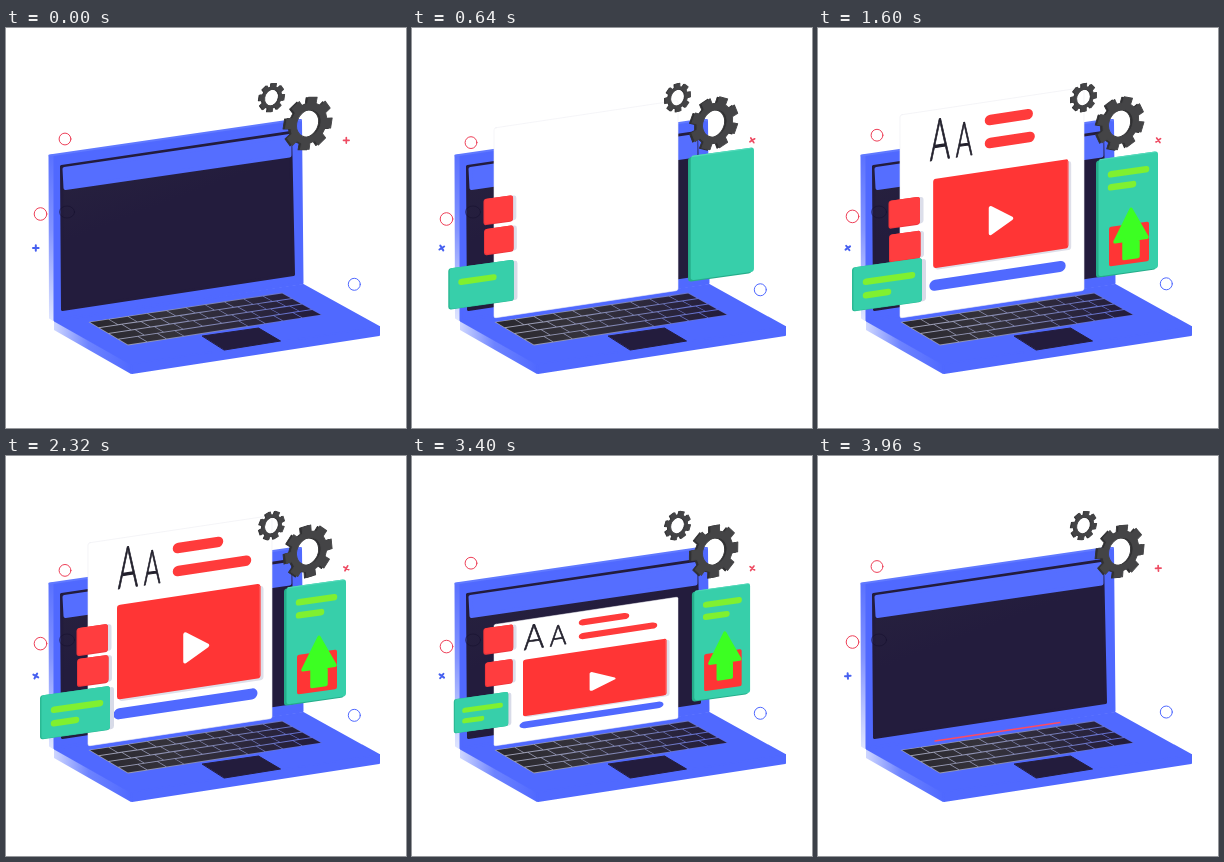
An HTML page for the animation above (4 s loop, 400 px wide and 400 px high).

```html
<!DOCTYPE html>
<html lang="en">
<head>
<meta charset="utf-8">
<title>Laptop interface</title>
<style>
  html, body { margin: 0; width: 100%; height: 100%; overflow: hidden; background: #fff; }
  svg { display: block; width: 100vw; height: 100vh; }
  .round { stroke-linejoin: round; stroke-linecap: round; }
  .lime { stroke: #80f030; stroke-width: 6.5; }
  .red { stroke: #ff3b3b; stroke-width: 10.5; }
  text { font-family: Lato, "Open Sans", sans-serif; font-weight: 300; fill: #22202c; stroke: #22202c; stroke-width: .6; text-anchor: middle; }
</style>
</head>
<body>
<svg viewBox="0 0 400 400" class="round">
  <defs>
    <linearGradient id="side" x1="0" y1="0" x2="0" y2="1">
      <stop offset="0" stop-color="#5b72ff"/><stop offset=".45" stop-color="#8394ff"/><stop offset="1" stop-color="#e0e6ff"/>
    </linearGradient>
    <linearGradient id="edge">
      <stop offset="0" stop-color="#cfd7ff"/><stop offset=".45" stop-color="#6d83ff"/><stop offset="1" stop-color="#5069ff"/>
    </linearGradient>
    <linearGradient id="glass" x1="0" y1="0" x2=".5" y2="1">
      <stop offset="0" stop-color="#29243f"/><stop offset=".5" stop-color="#231c3d"/>
    </linearGradient>
    <linearGradient id="gaps">
      <stop offset="0" stop-color="#a3a4b2"/><stop offset=".6" stop-color="#7c82b4"/><stop offset="1" stop-color="#5a69dd"/>
    </linearGradient>
    <linearGradient id="keyFill" gradientUnits="userSpaceOnUse" x1="83" y1="0" x2="316" y2="0">
      <stop offset="0" stop-color="#29272e"/><stop offset=".35" stop-color="#34323a"/><stop offset="1" stop-color="#231c3d"/>
    </linearGradient>
  </defs>

  <g id="laptop">
    <path d="M43.5 128 49 127V293L44 290Z" fill="url(#side)" stroke="url(#side)" stroke-width="2"/>
    <path d="M49 128.500 294.500 92.500 296 255 49 292Z" fill="#5069ff" stroke="#5069ff" stroke-width="3"/>
    <path d="M43.500 127.500 291 91.500 295 92.500" fill="none" stroke="#6079ff" stroke-width="2"/>
    <path d="M55.500 138.500 284.500 104.500 287.500 246.500 56.500 281.500Z" fill="url(#glass)" stroke="#231c3d" stroke-width="3"/>
    <path d="M58.500 141 283.500 108 283.500 127.500 59.500 160Z" fill="#556eff" stroke="#556eff" stroke-width="4"/>
    <ellipse cx="61" cy="184" rx="7.500" ry="6" fill="none" stroke="#17122e" opacity=".55"/>
    <path d="M48 293 125 336V346L48 302Z" fill="url(#edge)"/>
    <path d="M125 336 373 299V307L126 345Z" fill="#5069ff" stroke="#5069ff" stroke-width="2"/>
    <path d="M49 293 297 257 373 299 125 336Z" fill="#5069ff" stroke="#5069ff" stroke-width="2"/>
    <path d="M82.500 294 276 264.500 316.500 287 122 317.500Z" fill="url(#gaps)"/>
    <g id="keys" fill="url(#keyFill)"/>
    <path d="M196.500 308 252.500 300 274.500 313 218.500 322Z" fill="#231c3d" stroke="#231c3d"/>
  </g>

  <path id="sliver" d="M117 285 242 266.500" stroke="#ff4a62" stroke-width="1.300"/>

  <g id="page">
    <rect width="184" y="-203" height="203" rx="2" fill="#fff" stroke="#eeeef3" stroke-width=".6"/>
    <g id="letters">
      <text transform="translate(40 -152.500) scale(1 1.860)" font-size="31">A</text>
      <text transform="translate(64 -152.500) scale(1 1.860)" font-size="25.500">A</text>
    </g>
    <path id="bar1" class="red"/>
    <path id="bar2" class="red"/>
    <g id="video">
      <rect x="31" y="-134" width="144.500" height="94" rx="3" fill="#dedfe9"/>
      <rect x="29" y="-136.500" width="143.500" height="94.500" rx="3" fill="#ff3535"/>
      <path d="M172-134V-45" stroke="#ff6868"/>
      <path id="play" d="M90-97V-70L112-82.500Z" fill="#fff" stroke="#fff" stroke-width="4"/>
    </g>
    <path id="strip" stroke="#5069ff" stroke-width="11"/>
  </g>

  <g id="btn1" class="btn"></g>
  <g id="btn2" class="btn"></g>

  <g id="left">
    <rect x="-30" y="-20.500" width="69" height="42" rx="3" fill="#d8dbe8"/>
    <rect x="-35" y="-22" width="70" height="44" rx="3" fill="#2bb994"/>
    <rect x="-33.500" y="-22" width="68.500" height="43.500" rx="3" fill="#37cfaa"/>
    <path id="l1" class="lime"/>
    <path id="l2" class="lime"/>
  </g>

  <g id="right">
    <rect x="-31" y="-57.500" width="60" height="117" rx="3" fill="#25ad8a"/>
    <rect x="-28.500" y="-58.500" width="59.500" height="117" rx="3" fill="#37cfaa"/>
    <path d="M-27-58H28" stroke="#55dabb"/>
    <path id="r1" class="lime"/>
    <path id="r2" class="lime"/>
    <rect id="tile" x="-18" y="10.500" width="40" height="39.500" rx="2" fill="#ff3535"/>
    <g id="lift">
      <path id="arrow" d="M4-4 20 26H11V44H-3V26H-12Z" fill="#3cff22" stroke="#3cff22" stroke-width="3.500"/>
    </g>
  </g>

  <g id="small"></g>
  <g id="big"></g>

  <g fill="none">
    <circle id="ring1" cx="59" r="5.900" stroke="#ee4058"/>
    <circle id="ring2" cx="34.500" r="6.300" stroke="#ee4058"/>
    <circle id="ring3" cx="348.300" r="6" stroke="#5069ff"/>
    <path id="plus1" d="M-2.800 0H2.800M0-2.800V2.800" stroke="#ee4b62" stroke-width="1.700"/>
    <path id="plus2" d="M-2.800 0H2.800M0-2.800V2.800" stroke="#4660f0" stroke-width="2"/>
  </g>
</svg>
<script>
const LOOP = 4000, TAU = Math.PI * 2;
const el = {};
document.querySelectorAll('svg [id]').forEach(n => el[n.id] = n);
const set = (id, name, value) => el[id].setAttribute(name, value);
const show = (id, on) => set(id, 'visibility', on ? 'inherit' : 'hidden');

const clamp = v => Math.min(1, Math.max(0, v));
const smooth = p => p < .5 ? 4 * p ** 3 : 1 - 4 * (1 - p) ** 3;
const back = p => 1 + 2.7 * (p - 1) ** 3 + 1.7 * (p - 1) ** 2;
const ramp = (t, start, length, ease = smooth) => ease(clamp((t - start) / length));
const wave = (t, peak, period = 2000) => Math.cos(TAU * (t - peak) / period);

// Static parts
function buildKeys() {
  const at = (u, v) => {
    const x = 83 + 193 * u + 39 * v + u * v, y = 294 - 29 * u + 23 * v - u * v;
    return x.toFixed(1) + ' ' + y.toFixed(1);
  };
  const key = (u0, u1, row) => {
    const a = u0 + .0025, b = u1 - .0025, c = row / 4 + .018, d = (row + 1) / 4 - .018;
    return `<path d="M${at(a, c)} ${at(b, c)} ${at(b, d)} ${at(a, d)}Z"/>`;
  };
  let out = '';
  for (let row = 0; row < 4; row++) {
    const cuts = row === 3 ? [0, .1, .2, .29, .62, .71, .8, .9, 1] : [0];
    if (row < 3) {
      for (let i = 1; i < 10; i++) cuts.push(i / 10 + row * .018);
      cuts.push(1);
    }
    for (let i = 1; i < cuts.length; i++) out += key(cuts[i - 1], cuts[i], row);
  }
  el.keys.innerHTML = out;
}

function gearPath(outer, inner, hole) {
  const pts = [];
  for (let i = 0; i < 8; i++) {
    for (const [r, a] of [[inner, -.24], [outer, -.19], [outer, .19], [inner, .24]]) {
      const angle = i * TAU / 8 + a;
      pts.push((r * Math.cos(angle)).toFixed(2) + ' ' + (r * Math.sin(angle)).toFixed(2));
    }
  }
  return `M${pts.join('L')}ZM${hole} 0A${hole} ${hole} 0 1 0 ${-hole} 0A${hole} ${hole} 0 1 0 ${hole} 0Z`;
}

function buildGear(id, outer, inner, hole, depth) {
  const d = gearPath(outer, inner, hole);
  const layer = (x, y, color) =>
    `<g transform="matrix(.9 -.19 0 1 ${x} ${y})"><path class="spin" d="${d}" fill="${color}" stroke="${color}" fill-rule="evenodd"/></g>`;
  el[id].innerHTML = layer(-depth, depth * .3, '#303032') + layer(depth / 2, 0, '#444446');
}

buildKeys();
buildGear('big', 26, 20, 13.6, 1.6);
buildGear('small', 14, 10.6, 8.3, .8);
set('big', 'transform', 'translate(302 95.300)');
set('small', 'transform', 'translate(265.700 69.500)');
const spins = id => el[id].querySelectorAll('.spin');
const bigSpin = spins('big'), smallSpin = spins('small');
document.querySelectorAll('.btn').forEach(b => b.innerHTML =
  '<rect x="-11" y="-13.500" width="30" height="26.500" rx="3" fill="#dcdeea"/>' +
  '<rect x="-16" y="-14" width="31.500" height="28" rx="3" fill="#ee353b"/>' +
  '<rect x="-15" y="-14" width="30.500" height="27" rx="3" fill="#ff3d3f"/>');

// Moving parts
function panel(id, x, y, scale) {
  show(id, scale > .01);
  set(id, 'transform', `matrix(${scale} ${-.14 * scale} 0 ${scale} ${x} ${y})`);
}

function grow(id, x, y, length, p) {
  show(id, p > .01);
  set(id, 'd', `M${x} ${y}h${length * p}`);
}

function zoom(id, x, y, p) {
  show(id, p > .01);
  set(id, 'transform', `translate(${x} ${y}) scale(${p}) translate(${-x} ${-y})`);
}

function turn(nodes, angle) {
  nodes.forEach(n => n.setAttribute('transform', `rotate(${angle})`));
}

function draw(t) {
  const rise = ramp(t, 80, 750) * (1 - ramp(t, 2950, 970));
  show('page', rise > .006);
  set('page', 'transform', `matrix(1 -.15 0 ${rise} 82 290)`);
  show('sliver', t > 3800 && rise < .02);

  zoom('letters', 50, -170, ramp(t, 850, 400));
  const open = ramp(t, 1200, 530);
  zoom('video', 101, -89, open);
  const shift = t > 1660 ? 3.8 * (1 - wave(t, 1660, 1160)) : 0;
  set('play', 'transform', `translate(${shift} 0)`);
  grow('strip', 97.5 - 66.5 * open, -27.5, 133, open);
  grow('bar1', 90, -184.5, 40, open);
  grow('bar2', 90, -161.5, 68, ramp(t, 1310, 550));

  const leave = start => 1 - ramp(t, start, 700);
  panel('btn1', 86.5, 183.6 + 2 * wave(t, 1900), ramp(t, 190, 600) * leave(3238));
  panel('btn2', 87, 215.6 + 3.5 * wave(t, 1760), ramp(t, 190, 600) * leave(3183));

  panel('left', 69, 256.7, ramp(t, 260, 510) * leave(3134));
  grow('l1', -21, -6, 46, ramp(t, 400, 400));
  grow('l2', -21, 7.5, 22, ramp(t, 650, 350));

  panel('right', 309, 186, ramp(t, 280, 480, back) * leave(3227));
  grow('r1', -16, -42, 35, ramp(t, 700, 350));
  grow('r2', -16, -29, 22, ramp(t, 820, 350));
  zoom('tile', 2, 30, ramp(t, 900, 400));
  zoom('arrow', 4, 44, ramp(t, 1050, 400));
  set('lift', 'transform', `translate(0 ${-5 * ramp(t, 2850, 600)})`);

  const angle = 360 * t / LOOP;
  turn(bigSpin, angle + 10);
  turn(smallSpin, 10 - angle);
  set('plus1', 'transform', `translate(340.300 112.300) rotate(${angle})`);
  set('plus2', 'transform', `translate(29.800 220) rotate(${angle})`);

  set('ring1', 'cy', 111 + 4 * wave(t, 500));
  set('ring2', 'cy', 189.5 - 3.5 * wave(t, 0));
  set('ring3', 'cy', 258.7 - 3.3 * wave(t, -240));
}

const start = performance.now();
function tick() {
  draw((performance.now() - start) % LOOP);
  requestAnimationFrame(tick);
}
tick();
</script>
</body>
</html>
```
